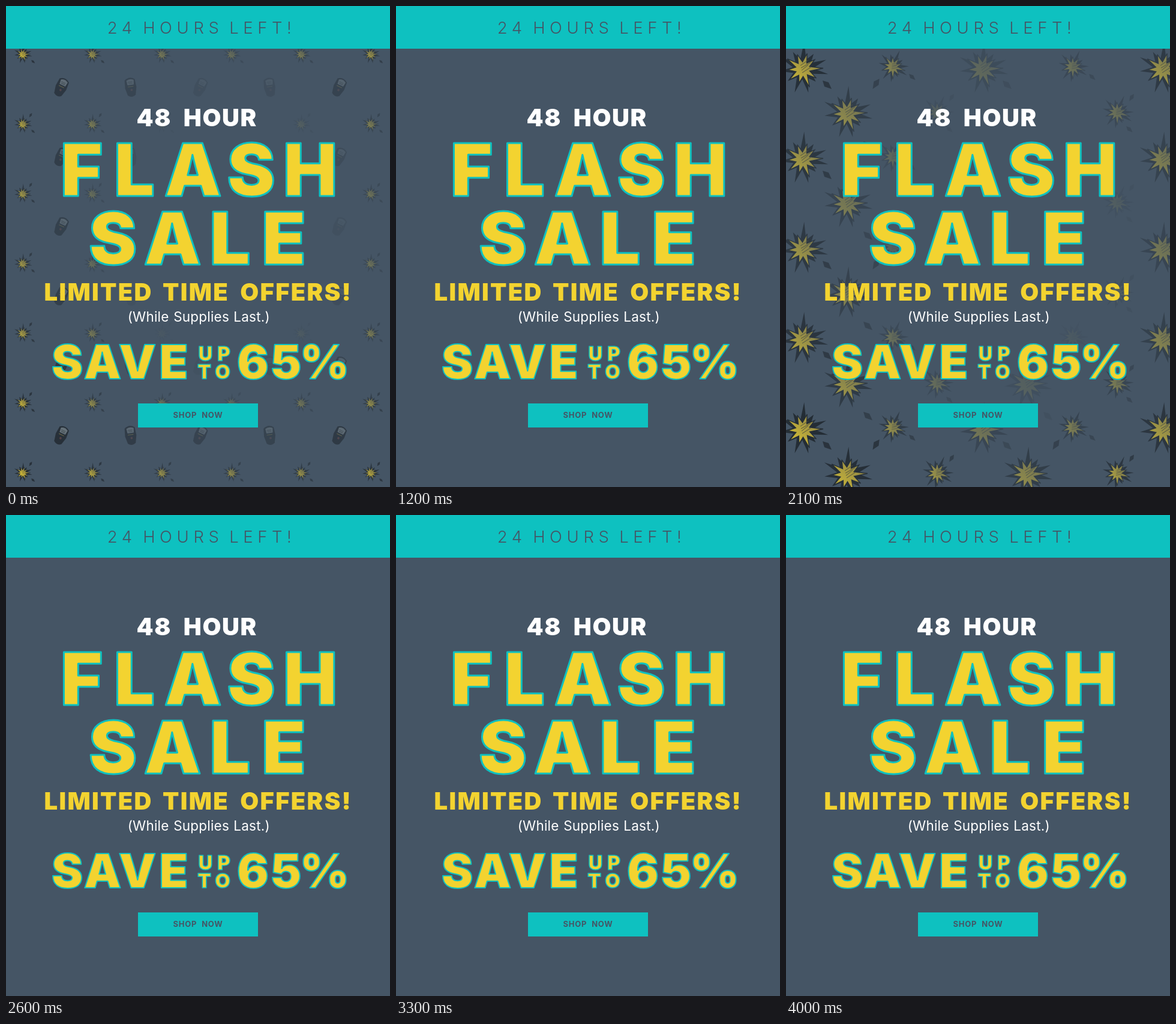
An HTML page for the animation above (4.2 s loop, 640 by 800 pixels).

```html
<!DOCTYPE html>
<html lang="en">
<head>
<meta charset="utf-8">
<title>Flash sale</title>
<style>
  html, body { margin: 0; width: 100%; height: 100%; overflow: hidden; background: #455565; }
  svg { display: block; width: 640px; height: 800px; }
  text { font-family: Inter, "Open Sans", sans-serif; text-anchor: middle; }
  .big { font-weight: 900; fill: #f3d330; stroke: #0ec1c0; stroke-linejoin: round; }
</style>
</head>
<body>
<svg viewBox="0 0 640 800" xmlns="http://www.w3.org/2000/svg">
  <defs>
    <linearGradient id="gold" x1="0" y1="1" x2="1" y2="0">
      <stop offset=".3" stop-color="#cfb936"/>
      <stop offset="1" stop-color="#857b45"/>
    </linearGradient>
    <g id="burst"></g>
    <path id="drop" d="M-7 -7L3 -4L8 7L-4 3Z" fill="#28313a"/>
    <g id="item">
      <path d="M-9 -13Q0 -20 9 -13L10 1L7 14Q0 20 -7 14L-10 1Z" fill="#1f262d"/>
      <path d="M-6 -12Q0 -16 7 -12L6 -4H-5Z" fill="#6f7a7f"/>
      <path d="M-4 -9H4M-3 -6.5H4" stroke="#3f4648" stroke-width="1"/>
      <path d="M-5 -1H5" stroke="#6a643c" stroke-width="1.2"/>
      <circle cx="1" cy="5" r="2" fill="#553a3c"/>
    </g>
  </defs>
  <rect width="640" height="800" fill="#455565"/>
  <g id="small"></g>
  <g id="large"></g>
  <rect width="640" height="71" fill="#0ec1c0"/>
  <rect x="220" y="661" width="200" height="40" fill="#0ec1c0"/>
  <g id="copy"></g>
</svg>
<script>
const LOOP = 4200;
const $ = id => document.getElementById(id);

// Starburst outline: one spike per radius, valleys at the core radius.
function star(radii, core, turn) {
  const step = 2 * Math.PI / radii.length;
  const at = (r, a) => `${(r * Math.cos(a)).toFixed(1)} ${(r * Math.sin(a)).toFixed(1)}`;
  return 'M' + radii.map((r, i) => {
    const a = turn + i * step;
    return at(r, a) + 'L' + at(core, a + step / 2);
  }).join('L') + 'Z';
}

const shade = [46, 31, 42, 43, 30, 40, 41, 32, 38, 43, 33];
const flare = [27, 25, 34, 27, 32, 24, 29, 25, 31, 26];
const hatch = [-6, -2, 2, 6].map((y, i) =>
  `M${-4 + i} ${y}L${9 + i % 2 * 4} ${y - 9}`).join('');
$('burst').innerHTML =
  `<path d="${star(shade, 17, -1.52)}" fill="#222a32"/>` +
  `<path d="${star(flare, 12, -1.3)}" fill="url(#gold)" stroke="#222a32" stroke-width="1.4"/>` +
  `<path d="${hatch}" stroke="#4b4b39" stroke-width=".9"/>`;

// The pattern fades out towards the middle of the stage.
function fade(x, y) {
  const d = Math.hypot((x - 370) / 340, (y - 380) / 440);
  return Math.max(0, Math.min(1, (d - .47) * 1.2));
}

const use = (id, x, y, scale = 1, turn = 0) =>
  `<use href="#${id}" transform="translate(${x} ${y}) rotate(${turn}) scale(${scale})"/>`;

function lattice(x0, y0, pitch, draw) {
  let out = '';
  for (let row = 0, y = y0; y < 830; row++, y = y0 + row * pitch)
    for (let col = 0, x = x0; x < 660; col++, x = x0 + col * pitch) {
      const o = fade(x, y);
      if (o > .02) out += `<g opacity="${o.toFixed(2)}">${draw(x, y, col)}</g>`;
    }
  return out;
}

$('small').innerHTML =
  lattice(28, 80.5, 116, (x, y) =>
    use('burst', x, y, .37) + use('drop', x + 13, y - 15, .42, 80) + use('drop', x + 17, y + 12, .4)) +
  lattice(92, 135, 115.8, (x, y, col) =>
    use('item', x, y, .95, col % 2 ? -8 : 25));

$('large').innerHTML =
  lattice(28, 105, 150, (x, y, col) => col % 2
    ? use('burst', x, y - 4, .64, 20) + use('drop', x + 32, y + 13, .7)
    : use('burst', x, y) + use('drop', x + 40, y + 26)) +
  lattice(102, 179, 150, (x, y, col) => col % 2
    ? use('burst', x, y - 2, .66, 20) + use('drop', x + 20, y + 26, .7) + use('drop', x + 24, y - 27, .7, 80)
    : use('burst', x, y) + use('drop', x + 34, y + 53) + use('drop', x + 48, y - 50, 1, 80));

// Words set by their centres; tracking leaves a trailing gap, so shift by half.
function words(list, y, size, weight, fill, gap) {
  return list.map(([word, x]) =>
    `<text x="${x + gap / 2}" y="${y}" font-size="${size}" font-weight="${weight}" ` +
    `fill="${fill}" letter-spacing="${gap}">${word}</text>`).join('');
}

// Display letters, each kerned by its centre.
const display = (str, xs, y, size, line) =>
  `<text class="big" x="${xs.join(' ')}" y="${y}" font-size="${size}" stroke-width="${line}">${str}</text>`;

const slate = '#455565', yellow = '#f3d330', white = '#fff';
$('copy').innerHTML =
  words([['24', 189.5], ['HOURS', 291.5], ['LEFT!', 424]], 46, 27.5, 300, slate, 7.6) +
  words([['48', 246], ['HOUR', 356.5]], 200, 40, 900, white, 1.6) +
  display('FLASH', [126, 214, 311.5, 408.5, 507], 315.5, 121, 3) +
  display('SALE', [178, 277.5, 373.5, 463], 429.5, 121, 3) +
  words([['LIMITED', 153], ['TIME', 315.5], ['OFFERS!', 482.5]], 490, 40, 900, yellow, 2.3) +
  words([['(While', 237], ['Supplies', 325.5], ['Last.)', 409.5]], 525, 22.5, 400, white, .2) +
  display('SAVE', [102, 161, 219, 279.5], 619.5, 79, 2) +
  display('UP', [332.5, 363], 590, 33, 1.6) +
  display('TO', [330.5, 361], 620, 33, 1.6) +
  display('65%', [411.5, 467, 531], 619.5, 79, 2) +
  words([['SHOP', 298], ['NOW', 343.5]], 685, 13, 700, slate, .7);

// Each flash: start, end, layer, shift.
const flashes = [
  [0, 500, 'small', '0 0'],
  [700, 1200, 'large', '0 0'],
  [1400, 1900, 'small', '-2 6'],
  [2100, 2600, 'large', '0 0'],
  [2800, 3300, 'large', '0 0'],
  [3500, 4000, 'large', '0 0']
];

const start = performance.now();
function tick(now) {
  const t = Math.max(0, now - start) % LOOP;
  const on = flashes.find(f => t >= f[0] && t < f[1]);
  for (const id of ['small', 'large'])
    $(id).setAttribute('visibility', on && on[2] === id ? 'visible' : 'hidden');
  if (on) $(on[2]).setAttribute('transform', `translate(${on[3]})`);
  requestAnimationFrame(tick);
}
tick(start);
</script>
</body>
</html>
```
